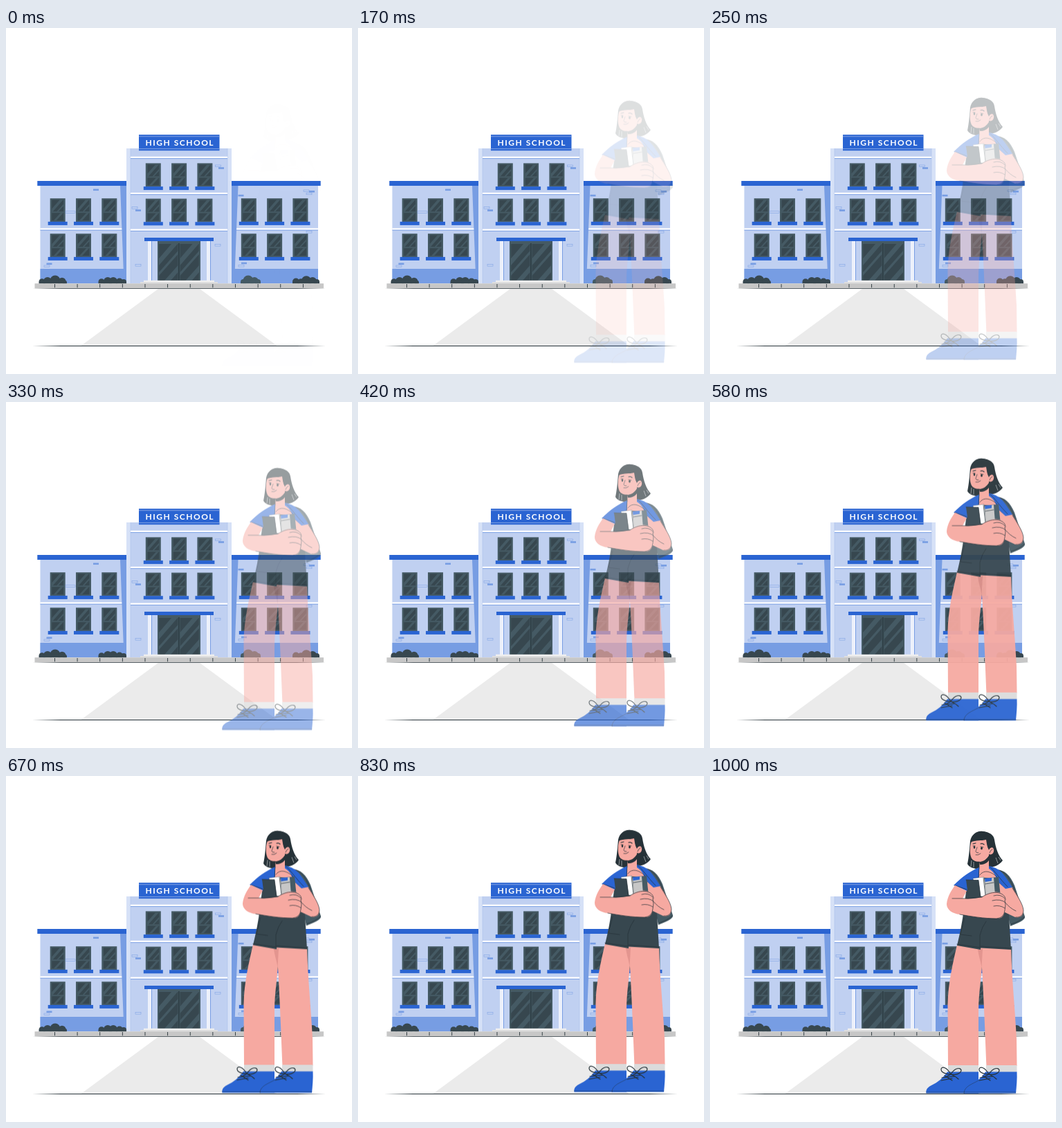
An HTML page that plays this animation: 500x500 px, repeating every 1.04 s.

```html
<!DOCTYPE html>
<html lang="en">
<head>
<meta charset="utf-8">
<title>High school</title>
<style>
  html, body { margin: 0; width: 100%; height: 100%; overflow: hidden; background: #fff; }
  svg { display: block; width: 100%; height: 100%; }
  .line { fill: none; stroke: #263238; stroke-width: .7; stroke-linecap: round; stroke-linejoin: round; }
  .brick { fill: none; stroke: #779de3; stroke-width: .5; }
  .sign { font: 700 12px Lato, "Open Sans", sans-serif; letter-spacing: 1.5px; fill: #fff; }
</style>
</head>
<body>
<svg viewBox="0 0 500 500">
  <g id="school"></g>
  <g id="girl">
    <!-- backpack -->
    <path fill="#455a64" d="M412 135C426 135 434 144 440 158L455 203C456 207 450 211 434 217L424 170Z"/>
    <path class="line" d="M418 136C431 141 438 157 443 174M454 204Q446 211 435 214"/>

    <!-- legs -->
    <g fill="#f6a9a1">
      <path d="M391 247L435 250C436 290 441 340 443 380L443.500 419H399.500C398 385 395 300 391 247Z"/>
      <path d="M357 244L394 250C394 285 388 310 388 340V419H344L343.500 330C344 300 351 270 357 244Z"/>
    </g>
    <path fill="#e3958f" d="M387 250L394 250L392.500 277C391 266 388 260 387 250Z"/>
    <path fill="#dbdbdb" d="M344 418H388V428H344ZM399 418H443.500V428H399Z"/>

    <!-- shoes -->
    <g fill="#2a64d2">
      <path d="M343 427.500H388V458.500H312.500C311.500 454 314 450 320 447C329 443 337 436 343 427.500Z"/>
      <path d="M398 427.500H443.500C444 438 443 448 442 458.500H367C366.500 454 369 450 375 447C385 442 393 436 398 427.500Z"/>
    </g>
    <path class="line" stroke-opacity=".6" d="M388 440C380 445 367 448 367 458.500M312.500 457H367M367 457H442"/>
    <g id="lace" class="line" style="stroke-width:1.2">
      <path d="M348 431C342 420 334 419 334 424C334 429 342 431 348 431C354 421 362 421 363 425C363 430 354 433 348 431M348 431Q355 434 359 438M348 431L341 435M335 436L354 434M334 440L350 437M339 433L350 440"/>
    </g>
    <use href="#lace" x="55"/>

    <!-- hair behind the head -->
    <path fill="#263238" d="M376 94C378 84 386 79 394 80C404 81 410 85 411 92C413 104 416 114 423 122C418 129 410 132 402 132L384 134C379 133 374 131 372 127C374 118 375 106 376 94Z"/>
    <path d="M378 122L377 131M381 124L381 132M417 117L420 122M413 118L416 126" fill="none" stroke="#fff" stroke-width=".5"/>

    <!-- shirt, neck and sleeves -->
    <path fill="#37474f" d="M371 160L389 143L418 141L431 160L432 200L435 251L391 248.500V251L357 245C361 228 365 210 367 190Z"/>
    <path class="line" d="M357 243L391 248M391 246L435 249M368 205Q364 220 362 229L378 231M399 210Q393 218 390 230V247"/>
    <path fill="#f6a9a1" d="M389 119L403 113V130C407 133 415 139 416 147H388C389 140 390 132 389 119Z"/>
    <path fill="#263238" d="M389 124C395 124 400 120 403 115V122C400 126 396 128 390 128Z"/>
    <g fill="#2a64d2">
      <path d="M389 132C375 138 364 146 352 158L371 166C374 158 381 150 389 146Z"/>
      <path d="M403 130C413 132 419 136 424 142C429 148 433 155 437 161L427 164L414 150C413 142 408 137 403 134Z"/>
    </g>
    <path class="line" d="M389 133L388 147M390 143C395 136 404 136 415 146M404 131C411 136 418 148 430 160M354 158L371 164"/>

    <!-- far arm -->
    <path fill="#f6a9a1" d="M416 153L427 163L437 161C443 171 452 184 453 195C453 202 448 206 441 204L424 196Z"/>
    <path class="line" d="M437 162C443 172 452 184 453 194C453 201 448 205 442 204M426 182Q433 191 442 195"/>

    <!-- books -->
    <path fill="#455a64" d="M405 147L417 146L420 175L410 175Z"/>
    <path fill="#c7c7c7" d="M397 148L410 147L412 172L398 174Z"/>
    <path fill="#2a64d2" d="M397 148L407 147V151.500L397.500 153Z"/>
    <path fill="#fff" stroke="#263238" stroke-width=".3" d="M380 148L396 146L399 174H386Z"/>
    <path fill="#37474f" d="M370 150L388 150.500L392 180L374 180Z"/>
    <path class="line" d="M370 150L388 150.500L391 175M395 147L398 173M398 156L410 154"/>

    <!-- near arm and hand -->
    <path fill="#f6a9a1" d="M354 158L371 166L365 177C375 178 384 177 393 175C400 170 409 166 417 168C424 170 427 174 427 180C428 185 427 190 426 195C425 203 421 206 414 206C396 206 377 203 361 200C350 199 342 193 342 185C343 174 349 165 354 158Z"/>
    <path class="line" d="M350 177Q372 178 393 175C400 170 410 167 418 169C424 171 427 174 427 179M410 173Q420 170 426 177M408 180Q420 177 427 183M410 188Q419 186 426 191M426 179Q428 186 426 194Q425 205 414 206C396 206 378 203 361 200"/>

    <!-- face and fringe -->
    <path fill="#f6a9a1" d="M378 94C375 102 375 113 378 119C381 124 389 125 395 122C400 119 402 116 403 113C408 115 411 110 410 106C409 102 405 103 403 106L401 91Z"/>
    <path fill="#263238" d="M376 96C379 85 386 79 394 80C405 81 411 88 410 103C407 102 404 104 403 107C400 102 400 97 399 92C392 94 384 92 376 96Z"/>
    <path class="line" d="M386 103C385 107 383 109 385 110.500L388 111M384 114Q388 115 391 112M404 111Q405 107 408 106"/>
    <path class="line" style="stroke-width:1.2" d="M380 98L384 97M391 98Q394 97 396 99"/>
    <g fill="#263238">
      <ellipse cx="382" cy="103" rx="1.300" ry="2"/>
      <ellipse cx="392.500" cy="104.500" rx="1.400" ry="2"/>
    </g>
    <path class="line" d="M380 101L383 101M391 102L395 103"/>
  </g>
</svg>
<script>
const BLUE = '#2a64d2', MID = '#779de3', PALE = '#c0d0f1', LIGHT = '#d6e1f7';
const SLATE = '#455a64', DARK = '#37474f', INK = '#263238';

const rect = (x, y, w, h, fill) => `<rect x="${x}" y="${y}" width="${w}" height="${h}" fill="${fill}"/>`;
const poly = (points, fill) => `<polygon points="${points}" fill="${fill}"/>`;
const brick = (x, y, w = 8) => `<rect class="brick" x="${x}" y="${y}" width="${w}" height="2.6"/>`;
const solid = (x, y) => rect(x, y, 8, 2.6, MID);
const ledge = (x, y, w) => rect(x, y, w, 2.4, '#fff') + rect(x, y + 2.4, w, .9, MID);

function glass(x, y) {
  return rect(x, y, 22, 34, SLATE)
    + rect(x + 2.5, y + 2, 17, 17, DARK) + rect(x + 2.5, y + 21, 17, 11, DARK)
    + poly(`${x + 14},${y + 2} ${x + 19},${y + 2} ${x + 4},${y + 19} ${x + 2.5},${y + 19} ${x + 2.5},${y + 15}`, SLATE)
    + poly(`${x + 19.5},${y + 8} ${x + 19.5},${y + 11} ${x + 12},${y + 19} ${x + 9.5},${y + 19}`, SLATE)
    + poly(`${x + 15},${y + 21} ${x + 19},${y + 21} ${x + 9},${y + 32} ${x + 5},${y + 32}`, SLATE)
    + rect(x - 3, y + 33.7, 28, 5, BLUE);
}

const windows = (x, rows) =>
  rows.map(y => [0, 37.3, 74.6].map(dx => glass(x + dx, y)).join('')).join('');

// Each bush is a row of domes: [centre, radius] on the ground.
const bush = (domes, fill) => domes.map(([x, r]) =>
  `<path d="M${x - r} 369.500V${369.5 - r * .6}A${r} ${r} 0 0 1 ${x + r} ${369.5 - r * .6}V369.500Z" fill="${fill}"/>`).join('');

function wings() {
  return rect(49.5, 228, 125, 141, PALE) + rect(326, 228, 125, 141, PALE)
    + rect(49.5, 348, 125, 21, MID) + rect(326, 348, 125, 21, MID)
    + ledge(49.5, 289.3, 125) + ledge(326, 289.3, 125)
    + poly('165,228 174.5,228 174.5,369 170.5,369', MID)
    + poly('335.500,228 326,228 326,369 330,369', MID)
    + rect(45.3, 221, 129, 7, BLUE) + rect(326, 221, 128.7, 7, BLUE)
    + windows(63.7, [246.2, 297.2]) + windows(339.8, [246.2, 297.2]);
}

function tower() {
  const lines = [185.8, 237.9, 290.5].map(y => ledge(180, y, 140)).join('');
  return rect(174, 174, 152, 195, LIGHT) + rect(180, 174, 140, 195, PALE)
    + rect(179.7, 174, .6, 195, '#a9bfec') + rect(319.7, 174, .6, 195, '#a9bfec')
    + lines + windows(201.8, [195.4, 246.6])
    + rect(192, 154.2, 116.5, 23, BLUE)
    + rect(192, 156.4, 116.5, .8, '#95b1e9') + rect(192, 174.3, 116.5, .8, '#95b1e9')
    + '<text class="sign" x="201.500" y="170.400">HIGH SCHOOL</text>';
}

function door() {
  const pane = x => rect(x, 312, 27.5, 53, DARK)
    + poly(`${x + 18},312 ${x + 27},312 ${x},343 ${x},333`, SLATE)
    + poly(`${x + 27.5},322 ${x + 27.5},327 ${x},358 ${x},353`, SLATE)
    + poly(`${x + 27.5},343 ${x + 27.5},353 ${x + 17},365 ${x + 8},365`, SLATE);
  return rect(219, 308, 62, 57.5, SLATE) + pane(221) + pane(251.5)
    + rect(249.3, 311, 1.2, 54, INK)
    + [205, 290].map(x => rect(x, 308, 5, 58, '#edf1fb') + rect(x + 5, 308, 1, 58, MID)).join('')
    + rect(200, 303, 100, 5, BLUE)
    + rect(199, 364.8, 102, 2.2, '#f0f0f0') + rect(194, 367, 112, 2.5, '#dedede');
}

function details() {
  const solids = [[126, 232.5], [58.5, 339.5], [187, 262.3], [307, 201.2], [335.5, 240.8], [438, 235], [340, 338.6]];
  const outlines = [[86, 264.8, 14], [55, 343], [182, 258.6], [302.5, 198], [302, 312.5], [187, 341.5],
    [430, 234], [434, 238.2], [336, 342.5], [434, 293.5]];
  return solids.map(b => solid(...b)).join('') + outlines.map(b => brick(...b)).join('');
}

function ground() {
  let ticks = '';
  for (let i = 0; i < 12; i++) ticks += rect(70 + i * 32.63, 370, .9, 5.2, INK);
  const taper = y => poly(`38,${y} 80,${y - .4} 420,${y - .4} 462,${y} 420,${y + .4} 80,${y + .4}`, INK);
  return bush([[52, 4.5], [60, 6], [71, 7.5], [81, 5.5], [85, 3]], DARK)
    + bush([[138, 4.5], [147, 6], [155, 6], [164, 5], [170, 4]], DARK)
    + bush([[343, 4], [350, 7.5], [359, 6], [364, 4]], SLATE)
    + bush([[419, 5], [426, 4.5], [434, 7], [443, 6], [449, 4]], DARK)
    + poly('220,377 280,377 392,459.500 108,459.500', '#ebebeb')
    + rect(41.5, 369.2, 417.5, 7, '#c7c7c7') + ticks + taper(376.6) + taper(459.5);
}

document.getElementById('school').innerHTML = wings() + tower() + details() + door() + ground();

const LOOP = 1040, FPS = 24;

const rise = document.getElementById('girl').animate(
  [{ opacity: 0, transform: 'translateY(30px)' }, { opacity: 1, transform: 'translateY(0px)' }],
  { duration: 1000, easing: 'cubic-bezier(.36, -.01, .5, 1.38)', fill: 'both' }
);
rise.pause();

// Steps begin on the 24 fps grid, rounded to 10 ms.
const stepStart = i => Math.round(i * 100 / FPS) * 10;

function show(ms) {
  let step = 0;
  while (step < FPS && stepStart(step + 1) <= ms) step++;
  rise.currentTime = Math.min(1000, (step + 1) * 1000 / FPS);
}

const start = performance.now();
function tick() {
  show((performance.now() - start) % LOOP);
  requestAnimationFrame(tick);
}
tick();
</script>
</body>
</html>
```
